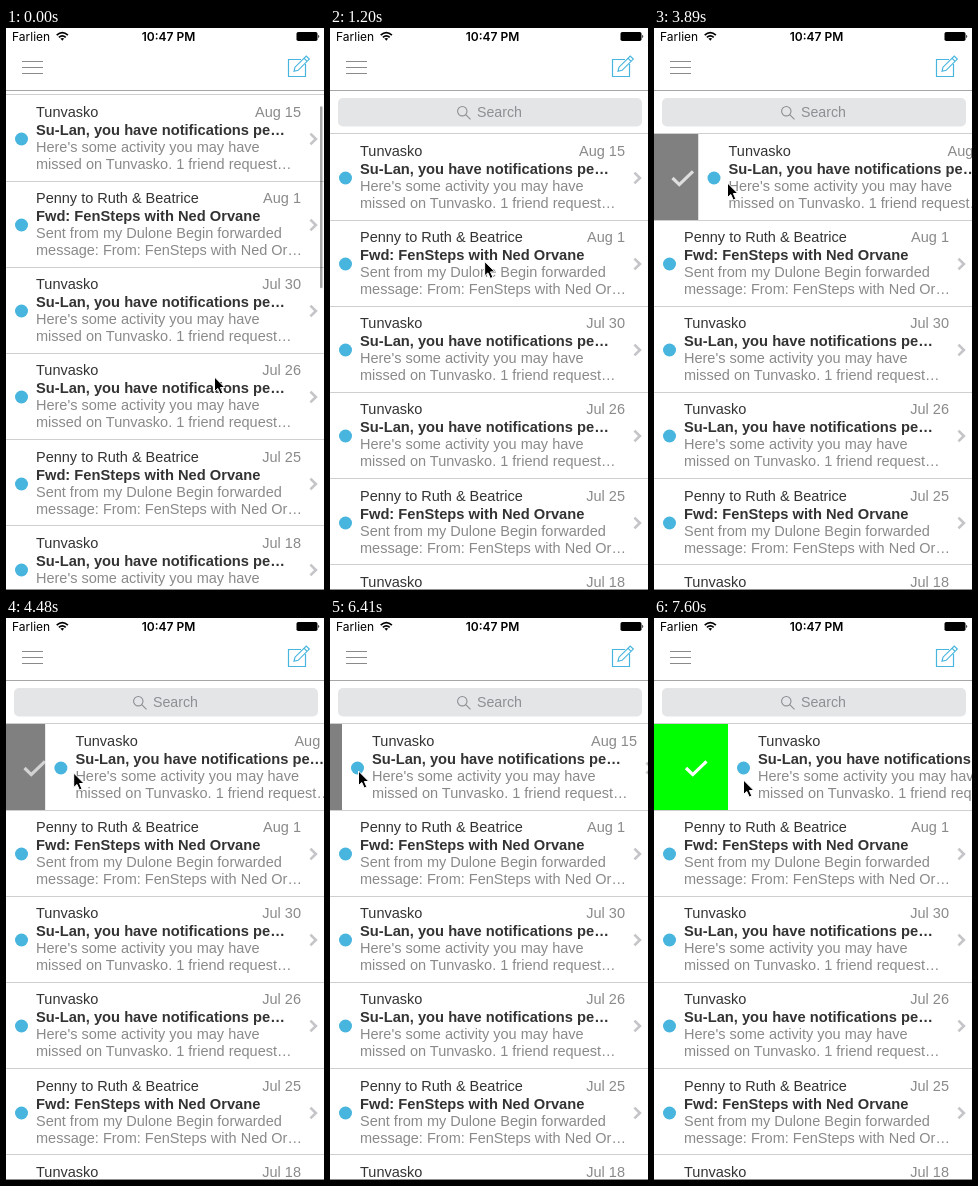
An HTML page for the animation above (8 s loop, 318 by 562 pixels).

```html
<!DOCTYPE html>
<html lang="en">
<head>
<meta charset="utf-8">
<title>Inbox swipe</title>
<style>
  html, body { margin: 0; width: 100%; height: 100%; overflow: hidden; background: #fff; }
  svg { display: block; width: 318px; height: 562px; }
  text { font: 14.5px "Liberation Sans", Arial, sans-serif; fill: #8a8a8a; white-space: pre; }
  .sender { fill: #333; }
  .subject { font-weight: bold; font-size: 14.7px; fill: #333; }
  .date { text-anchor: end; }
  .search { font-size: 14.2px; fill: #8e8e93; }
  .status { font: 12px Inter, sans-serif; fill: #000; }
  .clock { font-weight: 600; text-anchor: middle; }
  .line { fill: none; stroke-linecap: butt; }
</style>
</head>
<body>
<svg viewBox="0 0 318 562">
  <g id="list">
    <rect y="62" width="318" height="1" fill="#cfcfd1"/>
    <rect x="8" y="70" width="304" height="28.5" rx="5" fill="#e4e5e7"/>
    <g class="line" stroke="#8e8e93" stroke-width="1.1">
      <circle cx="132.3" cy="83.2" r="4.7"/>
      <path d="M135.7 86.6L140.5 91.4"/>
    </g>
    <text class="search" x="147" y="89">Search</text>
    <rect id="action" y="106" height="86"/>
    <path id="check" class="line" d="M-10 0L-3.2 6.6L10.5 -6.6" stroke="#fff" stroke-width="3.2"/>
    <g id="rows"></g>
  </g>
  <rect id="scrollbar" x="314" width="2.5" rx="1.2" fill="#000"/>

  <rect width="318" height="62" fill="#fff"/>
  <rect y="62" width="318" height="1" fill="#a6a6a6"/>
  <rect y="561" width="318" height="1" fill="#8f8f8f"/>
  <text class="status" x="6" y="12.5">Farlien</text>
  <text class="status clock" x="162.5" y="12.5">10:47 PM</text>
  <g class="line" stroke="#000" stroke-width="1.7">
    <path d="M50.7 7.2Q56.3 2.2 61.9 7.2M52.9 9.4Q56.3 6.3 59.7 9.4"/>
    <path d="M54.4 10.6Q56.3 9.2 58.2 10.6L56.3 12.7Z" fill="#000" stroke="none"/>
  </g>
  <rect x="290.5" y="4" width="21" height="9" rx="1.8"/>
  <path d="M312.3 6.8Q314.2 8.5 312.3 10.2Z"/>
  <path class="line" d="M16 33.5H37M16 39.5H37M16 45.5H37" stroke="#8a8a8a"/>
  <g class="line" stroke="#47b5dd" stroke-width="1.2">
    <path d="M295 31.5H282.5V48.5H299.5V36"/>
    <path d="M288 43.3L289 39.2L300.2 28L303.3 31.1L292.1 42.3ZM298 30.2L301.1 33.3"/>
  </g>
  <path id="cursor" d="M0 0V14.5L3.3 11.5L5.7 17L8.3 15.9L5.9 10.5H10.4Z"
        stroke="#fff" stroke-width="1" stroke-linejoin="round"/>
</svg>
<script>
const LOOP = 8000, STEP = 148.85, ROW_PITCH = 86.15, LIST_TOP = 105.4, TRIGGER = 60.5;
const $ = id => document.getElementById(id);

const social = {
  sender: "Tunvasko",
  subject: "Su-Lan, you have notifications pe…",
  lines: ["Here's some activity you may have", "missed on Tunvasko. 1 friend request…"]
};
const forward = {
  sender: "Penny to Ruth &amp; Beatrice",
  subject: "Fwd: FenSteps with Ned Orvane",
  lines: ["Sent from my Dulone Begin forwarded", "message: From: FenSteps with Ned Or…"]
};
const inbox = [
  [social, "Aug 15"], [forward, "Aug 1"], [social, "Jul 30"],
  [social, "Jul 26"], [forward, "Jul 25"], [social, "Jul 18"], [social, "Jul 15"]
];

function rowMarkup([mail, date], i) {
  const y = LIST_TOP + i * ROW_PITCH;
  return `<g transform="translate(0 ${Math.floor(y)})"><g class="content">
      <rect y="1" width="318" height="86" fill="#fff"/>
      <circle cx="15.5" cy="45" r="6.5" fill="#47b5dd"/>
      <text class="sender" x="30" y="23">${mail.sender}</text>
      <text class="date" x="295" y="23">${date}</text>
      <text class="subject" x="30" y="41">${mail.subject}</text>
      <text x="30" y="58">${mail.lines[0]}</text>
      <text x="30" y="75">${mail.lines[1]}</text>
      <path class="line" d="M304.4 39.6L309.9 45L304.4 50.4" stroke="#c4c4c9" stroke-width="2.6"/>
    </g></g>
    <rect y="${Math.round(y)}" width="318" height="1" fill="#cfcfd1"/>`;
}
$("rows").innerHTML = inbox.map(rowMarkup).join("");
const swiped = document.querySelector(".content");

// Keys: [step, value...]
const scrollKeys = [[0, -39], [1, -22], [2, -6], [3, 4], [4, 3], [5, 1.5], [6, 0]];
// Keys: [step, cursor x, cursor y, row slide]
const swipeKeys = [
  [0, 208.5, 349, 0], [3, 210.5, 353, 0], [6, 173, 245, 0], [7, 173, 245, 0],
  [15, 26, 152, 0], [16, 18.5, 150, 0], [17, 18.5, 150, 0],
  [22, 74.5, 154, 46], [25, 74.5, 154, 46], [26, 73.5, 155, 44.5], [28, 74.5, 155, 46],
  [29, 74.5, 155, 46], [34, 40.5, 155, 13], [36, 23, 154, -4], [37, 23, 154, -4],
  [39, 5, 153, 0], [41, 5, 153, 0], [43, 28.5, 153, 12], [51, 89.5, 162, 74]
];

function sample(keys, step) {
  const next = keys.findIndex(key => key[0] > step);
  if (next < 0) return keys[keys.length - 1].slice(1);
  const a = keys[next - 1], b = keys[next];
  const mix = (step - a[0]) / (b[0] - a[0]);
  return a.slice(1).map((v, i) => v + (b[i + 1] - v) * mix);
}

function move(element, x, y) {
  element.setAttribute("transform", `translate(${x} ${y})`);
}

function draw(now) {
  // The screen refreshes in coarse, even steps.
  const step = Math.floor((now % LOOP) / STEP);
  const [scroll] = sample(scrollKeys, step);
  const [x, y, slide] = sample(swipeKeys, step);
  const armed = slide >= TRIGGER;

  move($("list"), 0, Math.round(scroll));
  move($("cursor"), x, y);
  move(swiped, slide, 0);

  $("action").setAttribute("width", Math.max(0, slide));
  $("action").setAttribute("fill", armed ? "#00ff00" : "#808080");
  move($("check"), 28.5 + Math.max(0, slide - TRIGGER), 150);
  $("check").setAttribute("opacity", Math.min(1, Math.max(0, slide / TRIGGER)));

  $("scrollbar").setAttribute("y", 64 + Math.max(0, -scroll) * 0.365);
  $("scrollbar").setAttribute("height", 182 - Math.max(0, scroll));
  $("scrollbar").setAttribute("opacity", step < 5 ? 0.35 : step < 6 ? 0.18 : 0);
}

const start = performance.now();
function tick() {
  draw(performance.now() - start);
  requestAnimationFrame(tick);
}
tick();
</script>
</body>
</html>
```
